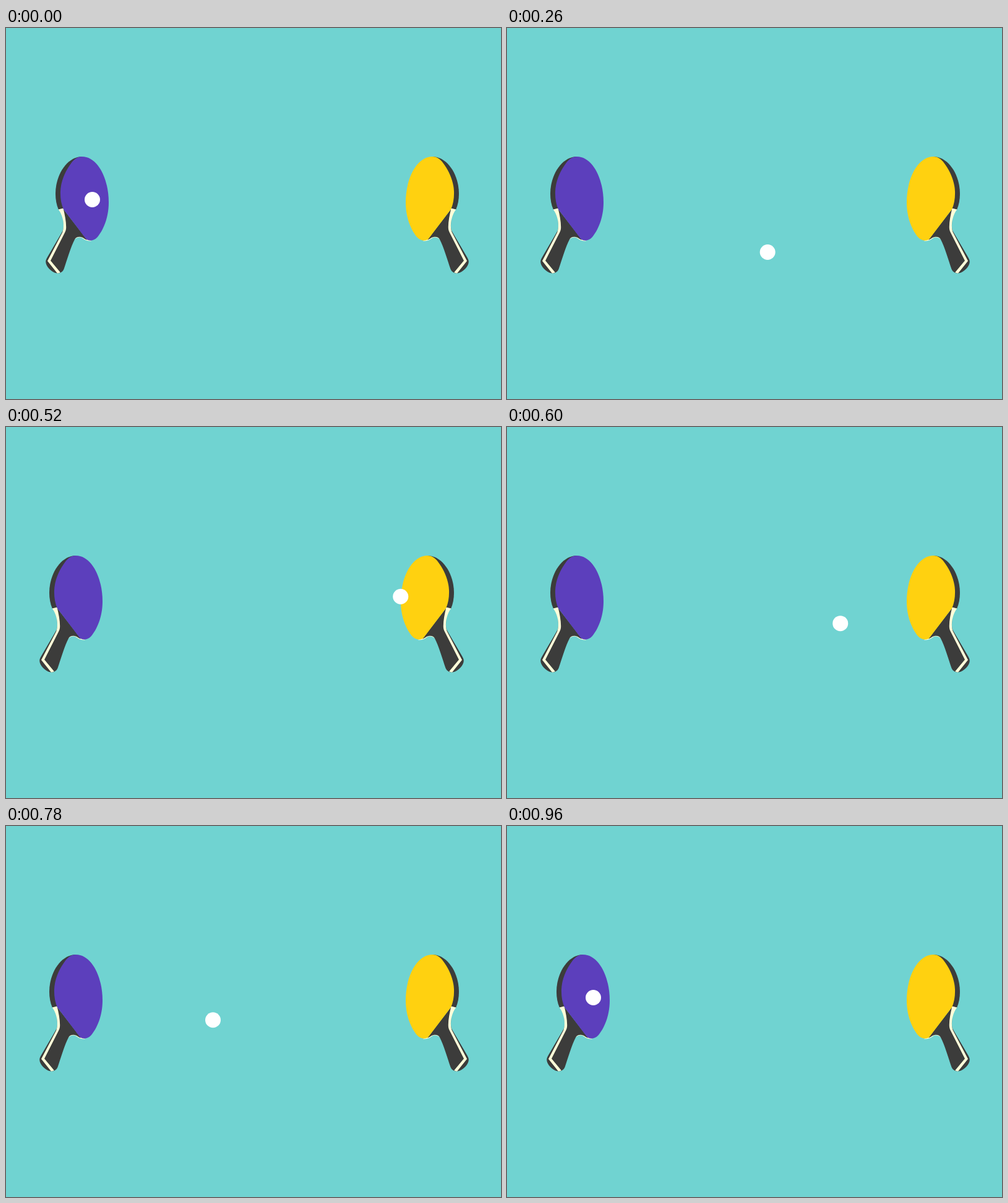
An HTML page that plays this animation: 800 px wide and 600 px high, repeating every 980 ms.

```html
<!DOCTYPE html>
<html lang="en">
<head>
<meta charset="utf-8">
<title>Table tennis rally</title>
<style>
  html, body { margin: 0; width: 100%; height: 100%; overflow: hidden; background: #70d3d1; }
  svg { display: block; }
</style>
</head>
<body>
<svg width="800" height="600" viewBox="0 0 800 600">
  <defs>
    <g id="paddle">
      <path fill="#3c3c3b" d="M113 208C89 208 70 237 70 268C70 277 71.5 286 74.8 293.5L84 292L113 240Z"/>
      <path fill="#ffffd9" d="M101 342C104 338 111 337.3 114.5 340.5C118 343.7 123 344.8 128 344.4L116 333L103 334Z"/>
      <path fill="#3c3c3b" d="M82 292L121 342.5C117 342 116 339 111 338C106 337.3 103 338.5 101 342C95 353 88 377 83.5 390C81.5 395 77 397 72 396.6C63 395 54 385 54.2 377.5C54.3 375 56 372 57.5 369.5L80 331C82.5 327 83 325 83 319Z"/>
      <path fill="#ffffd9" d="M74.8 293.5L82.5 291.5C85 302 87.2 312 87.2 322C87.2 326 86.4 328.5 85 331L62 376.2L77.8 395.2Q76 396.6 73 396.7L57 376.8L81 331C84.5 323 84 306 74.8 293.5Z"/>
      <path class="face" d="M113 208C138 208 156 243 156 282C156 308 146.5 328 137.5 338.5C132.5 343.8 126 345.2 119.8 341.8L82.8 293C79 284 77.6 275 78 264C78.6 248 85.5 233 93 222C99 212.5 105 208 113 208Z"/>
    </g>
  </defs>
  <g id="left" fill="#5c3fbc"><use href="#paddle"/></g>
  <g id="right" fill="#ffd110"><use href="#paddle" transform="matrix(-1 0 0 1 802 0)"/></g>
  <circle id="ball" r="12.5" fill="#fff"/>
</svg>
<script>
  const STEP = 20, LOOP = 980;
  const LEFT_HIT = 139.5, BOUNCE = 464.5, RIGHT_HIT = 662.5;
  const [left, right, ball] = ["left", "right", "ball"].map(id => document.getElementById(id));

  // Height of the arc from a hit (s = 0) down to the bounce (s = 1).
  const arc = s => 277.5 - 52.7 * s + 221.2 * s * s - 54.5 * s ** 3;

  const fly = (hitX, s) => [hitX + (BOUNCE - hitX) * s, arc(s)];

  function ballAt(t) {
    if (t <= 300) return fly(LEFT_HIT, t / 300);
    if (t <= 480) return fly(RIGHT_HIT, (480 - t) / 180);
    if (t <= 500) return fly(RIGHT_HIT, 0);
    if (t <= 660) return fly(RIGHT_HIT, (t - 500) / 160);
    return fly(LEFT_HIT, (960 - t) / 300);
  }

  // Swing of 10 px, 100 ms forward and 100 ms back.
  const swing = gap => Math.max(0, 10 - Math.max(0, gap) / 10);

  function draw(now) {
    const t = Math.floor((now % LOOP) / STEP) * STEP;
    const [x, y] = ballAt(t);
    ball.setAttribute("cx", x);
    ball.setAttribute("cy", y);
    left.setAttribute("transform", `translate(${swing(Math.min(t, 960 - t))})`);
    right.setAttribute("transform", `translate(${-swing(Math.max(480 - t, t - 500))})`);
  }

  const start = performance.now();
  function loop() {
    draw(performance.now() - start);
    requestAnimationFrame(loop);
  }
  loop();
</script>
</body>
</html>
```
